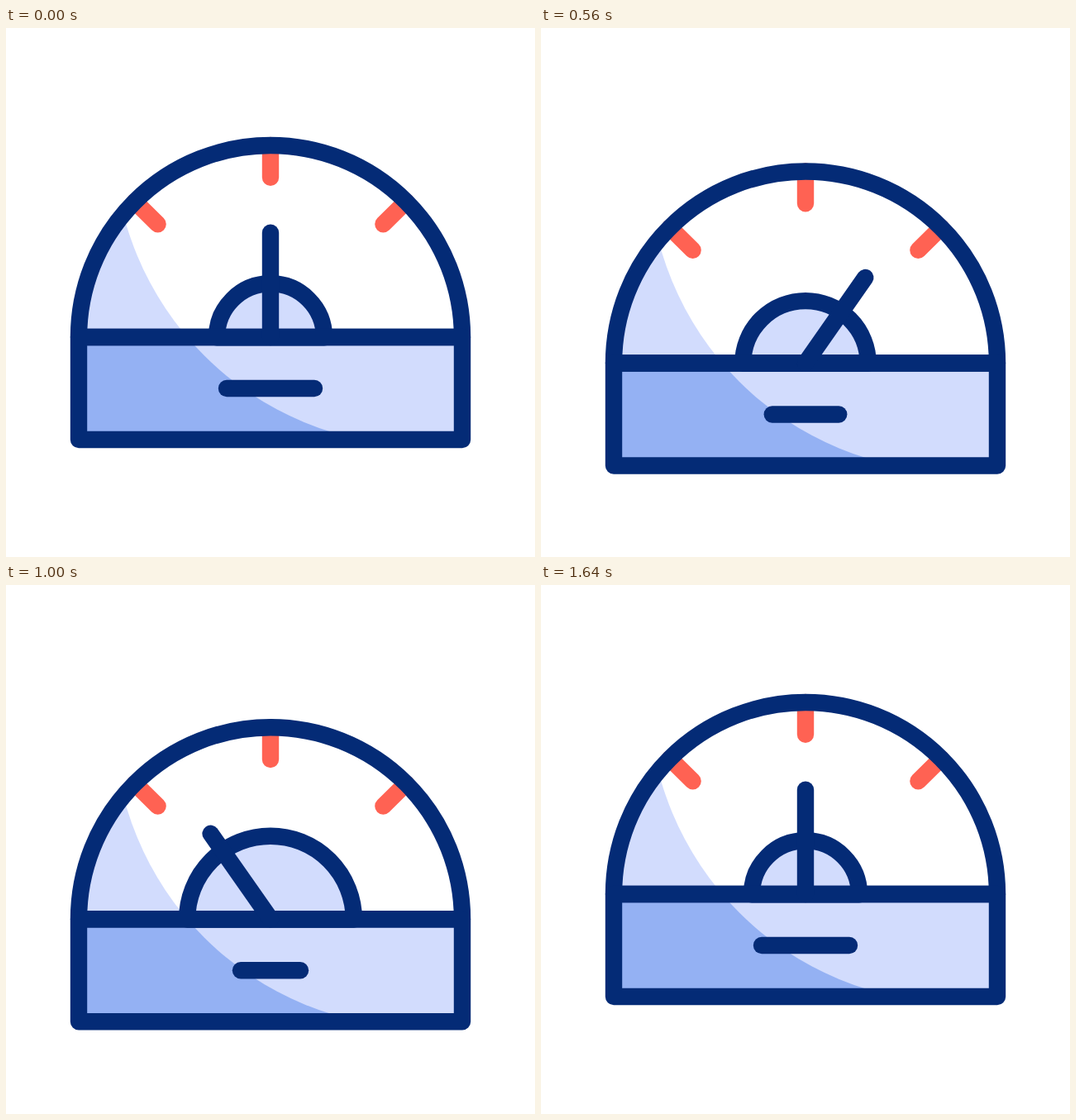
Write an HTML page that moves like this. It is 640x640 px and loops after 1840 ms.

```html
<!DOCTYPE html>
<html lang="en">
<head>
<meta charset="utf-8">
<title>Gauge</title>
<style>
  html, body { margin: 0; width: 100%; height: 100%; overflow: hidden; background: #fff; }
  svg { display: block; width: 100vw; height: 100vh; }
  .line { fill: none; stroke: #042b76; stroke-width: 20.4; stroke-linecap: round; stroke-linejoin: round; }
  .tick { fill: none; stroke: #ff6253; stroke-width: 20.4; stroke-linecap: round; }
  .pale { fill: #d2dcfd; }
  .mid { fill: #94b1f3; }
  .white { fill: #fff; }
</style>
</head>
<body>
<svg viewBox="0 0 640 640">
  <defs>
    <path id="domeShape" d="M88 374A232 232 0 0 1 552 374Z"/>
    <path id="baseShape" d="M88 374H552V498H88Z"/>
    <clipPath id="inDome"><use href="#domeShape"/></clipPath>
    <clipPath id="inBase"><use href="#baseShape"/></clipPath>
  </defs>
  <g id="body">
    <use href="#domeShape" class="pale"/>
    <circle class="white" cx="503.6" cy="132" r="373.4" clip-path="url(#inDome)"/>
    <use href="#baseShape" class="mid"/>
    <circle class="pale" cx="503.6" cy="132" r="373.4" clip-path="url(#inBase)"/>
    <path class="tick" d="M320 142V180.8M156 210L183.6 237.3M484 210L456.4 237.3"/>
    <path id="hub" class="line" style="fill:#d2dcfd"/>
    <use href="#domeShape" class="line"/>
    <use href="#baseShape" class="line"/>
    <path id="needle" class="line" d="M320 374V247.7"/>
    <path id="slot" class="line"/>
  </g>
</svg>
<script>
const LOOP = 1840, STEP = 40;

// Each track lists [time, value] keys; every span eases in and out.
const tracks = {
  drop:  [[48, 0], [756, 36.3], [785, 36.3], [1487, 0]],
  angle: [[125, 0], [549, 35], [990, -35], [1604, 0]],
  slot:  [[140, 53], [843, 34.4], [1530, 53]],
  hub:   [[298, 65], [965, 101], [1629, 65]]
};

// cubic-bezier(.5, 0, .5, 1)
function ease(x) {
  let lo = 0, hi = 1;
  for (let i = 0; i < 24; i++) {
    const u = (lo + hi) / 2;
    if (1.5 * u * (1 - u) + u * u * u < x) lo = u; else hi = u;
  }
  return lo * lo * (3 - 2 * lo);
}

function valueAt(keys, t) {
  if (t <= keys[0][0]) return keys[0][1];
  for (let i = 1; i < keys.length; i++) {
    const [t0, a] = keys[i - 1], [t1, b] = keys[i];
    if (t < t1) return a + (b - a) * ease((t - t0) / (t1 - t0));
  }
  return keys[keys.length - 1][1];
}

const set = (id, name, value) => document.getElementById(id).setAttribute(name, value);

function draw(t) {
  const at = name => valueAt(tracks[name], t);
  const r = at('hub'), half = at('slot');
  set('body', 'transform', `translate(0 ${at('drop')})`);
  set('needle', 'transform', `rotate(${at('angle')} 320 374)`);
  set('hub', 'd', `M${320 - r} 374.3A${r} ${r} 0 0 1 ${320 + r} 374.3Z`);
  set('slot', 'd', `M${320 - half} 436H${320 + half}`);
}

const start = performance.now();
function tick() {
  const t = (performance.now() - start) % LOOP;
  draw(Math.floor(t / STEP) * STEP);
  requestAnimationFrame(tick);
}
tick();
</script>
</body>
</html>
```
